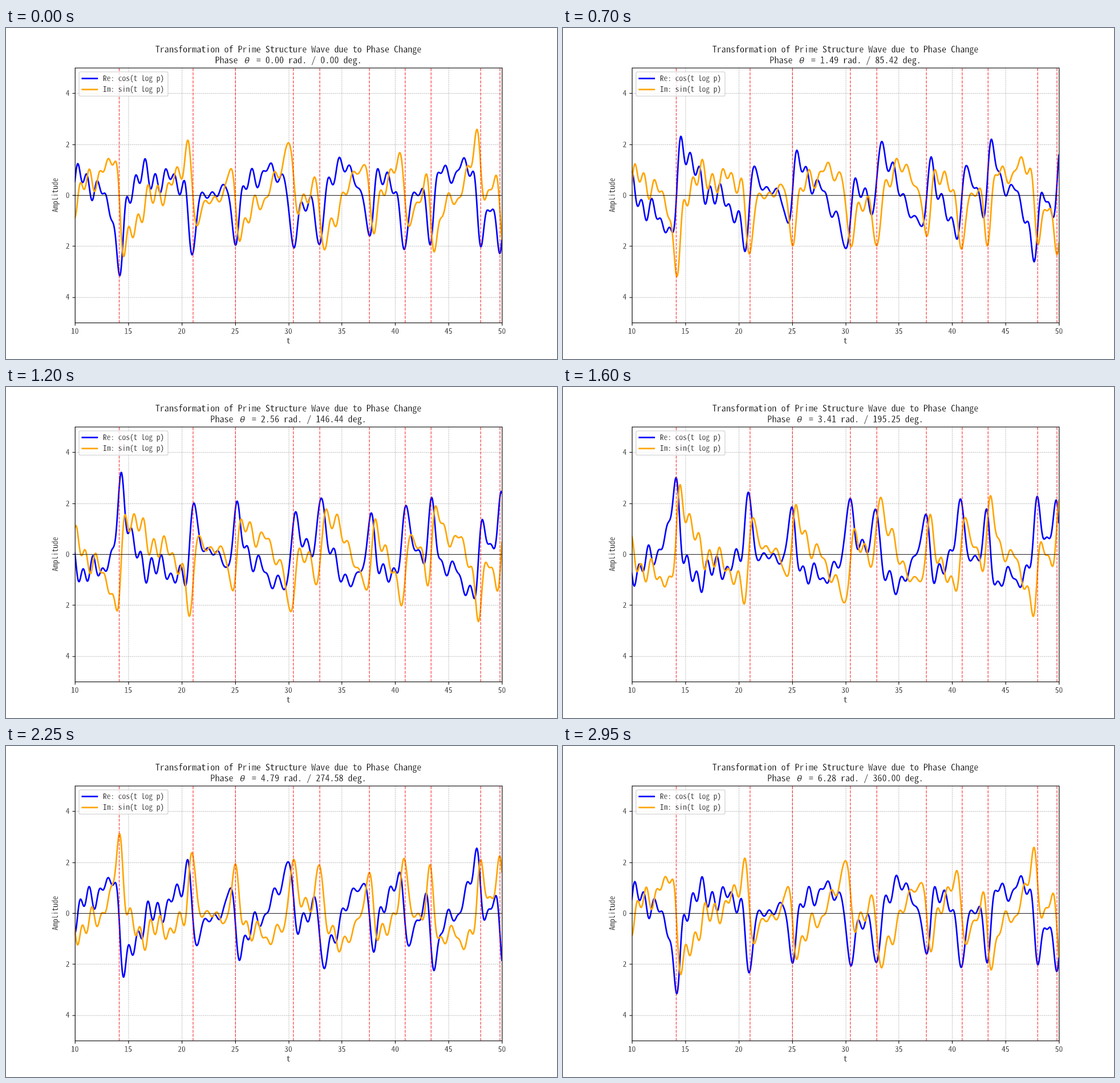
An HTML page for the animation above (3 s loop, 966 by 580 pixels).

```html
<!DOCTYPE html>
<html lang="en">
<head>
<meta charset="utf-8">
<title>Prime wave phase</title>
<style>
html, body { margin: 0; width: 100%; height: 100%; overflow: hidden; background: #fff; }
svg { display: block; width: 966px; height: 580px; }
text {
  font: 300 13.89px "Noto Sans Mono CJK JP", "Noto Sans CJK JP", "Noto Sans CJK", "Liberation Mono", monospace;
  font-feature-settings: "hwid";
  white-space: pre;
  stroke: #fff;
  stroke-width: .3;
}
.title { font-size: 16.67px; text-anchor: middle; }
.theta { font: italic 15px "DejaVu Sans", sans-serif; }
.mid { text-anchor: middle; }
.end { text-anchor: end; }
path, rect { fill: none; }
.grid { stroke: #b0b0b0; stroke-width: .8; stroke-dasharray: 2.57 1.11; }
.wave { stroke-width: 2.78; stroke-linejoin: round; stroke-linecap: square; }
.zero { stroke: red; stroke-opacity: .7; stroke-width: 1.39; stroke-dasharray: 5.14 2.22; }
.axis { stroke: #000; stroke-width: 1.11; }
.base { stroke: #000; stroke-width: .9; }
.box { fill: #fff; stroke: #ccc; stroke-width: 1.39; opacity: .8; }
.re { stroke: blue; }
.im { stroke: orange; }
</style>
</head>
<body>
<svg viewBox="0 0 1000 600" preserveAspectRatio="none">
  <clipPath id="plot"><rect x="125" y="72" width="775" height="462"/></clipPath>
  <path id="grid" class="grid"/>
  <g clip-path="url(#plot)">
    <path id="re" class="wave re"/>
    <path id="im" class="wave im"/>
    <path class="base" d="M125 303.5H900"/>
    <path id="zeros" class="zero"/>
  </g>
  <path id="ticks" class="axis"/>
  <rect class="axis" x="125.5" y="72.5" width="775" height="462"/>
  <g id="labels"></g>
  <text class="mid" x="512.5" y="572">t</text>
  <text class="mid" transform="translate(93.7 303) rotate(-90)">Amplitude</text>
  <rect class="box" x="132.5" y="79.5" width="161.5" height="44" rx="2.8"/>
  <path class="wave re" d="M138.5 91.5H165.5"/>
  <path class="wave im" d="M138.5 111.5H165.5"/>
  <text x="176" y="96.2">Re: cos(t log p)</text>
  <text x="176" y="115.7">Im: sin(t log p)</text>
  <text class="title" x="512.5" y="45">Transformation of Prime Structure Wave due to Phase Change</text>
  <text class="title" x="512.5" y="64.3">Phase <tspan class="theta" dx="3.7">θ</tspan><tspan id="phase" dx="3.7"></tspan></text>
</svg>
<script>
const $ = id => document.getElementById(id);
const LEFT = 125, RIGHT = 900, TOP = 72, BOTTOM = 534;
const px = t => LEFT + (t - 10) / 40 * (RIGHT - LEFT);
const py = v => (TOP + BOTTOM) / 2 - v * (BOTTOM - TOP) / 10;
const snap = v => Math.round(v) + .5;
const upright = t => `M${snap(px(t))} ${snap(BOTTOM)}V${TOP}`;

// Static axes
let grid = '', ticks = '';
function label(x, y, cls, value) {
  const el = document.createElementNS('http://www.w3.org/2000/svg', 'text');
  el.setAttribute('x', x);
  el.setAttribute('y', y);
  el.setAttribute('class', cls);
  el.textContent = value;
  $('labels').append(el);
}
for (let t = 10; t <= 50; t += 5) {
  grid += upright(t);
  ticks += `M${snap(px(t))} ${snap(BOTTOM)}v4.86`;
  label(px(t), 554.2, 'mid', t);
}
for (let v = -4; v <= 4; v += 2) {
  const y = snap(py(v));
  grid += `M${snap(LEFT)} ${y}H${RIGHT}`;
  ticks += `M${snap(LEFT)} ${y}h-4.86`;
  label(115.3, py(v) + 5.1, 'end', Math.abs(v));
}
$('grid').setAttribute('d', grid);
$('ticks').setAttribute('d', ticks);

const zeros = [14.1347, 21.022, 25.0109, 30.4249, 32.9351, 37.5862, 40.9187, 43.3271, 48.0052, 49.7738];
$('zeros').setAttribute('d', zeros.map(upright).join(''));

// Sum of p^(-1/2 + it) over the primes below 1000
const primes = [];
for (let n = 2; n < 1000; n++) if (primes.every(p => n % p)) primes.push(n);
const samples = Array.from({ length: 1000 }, (_, i) => {
  const t = 10 + 40 * i / 999;
  let c = 0, s = 0;
  for (const p of primes) {
    const a = t * Math.log(p), w = 1 / Math.sqrt(p);
    c += w * Math.cos(a);
    s += w * Math.sin(a);
  }
  return { x: px(t).toFixed(2), c, s };
});
const curve = f => 'M' + samples.map(q => q.x + ' ' + py(f(q)).toFixed(2)).join('L');

let shown = -1;
function draw() {
  const step = Math.floor(performance.now() / 50) % 60;
  if (step !== shown) {
    shown = step;
    const a = 2 * Math.PI * step / 59, cos = Math.cos(a), sin = Math.sin(a);
    $('re').setAttribute('d', curve(q => q.c * cos - q.s * sin));
    $('im').setAttribute('d', curve(q => q.s * cos + q.c * sin));
    $('phase').textContent = ` = ${a.toFixed(2)} rad. / ${(step * 360 / 59).toFixed(2)} deg.`;
  }
  requestAnimationFrame(draw);
}
draw();
</script>
</body>
</html>
```
